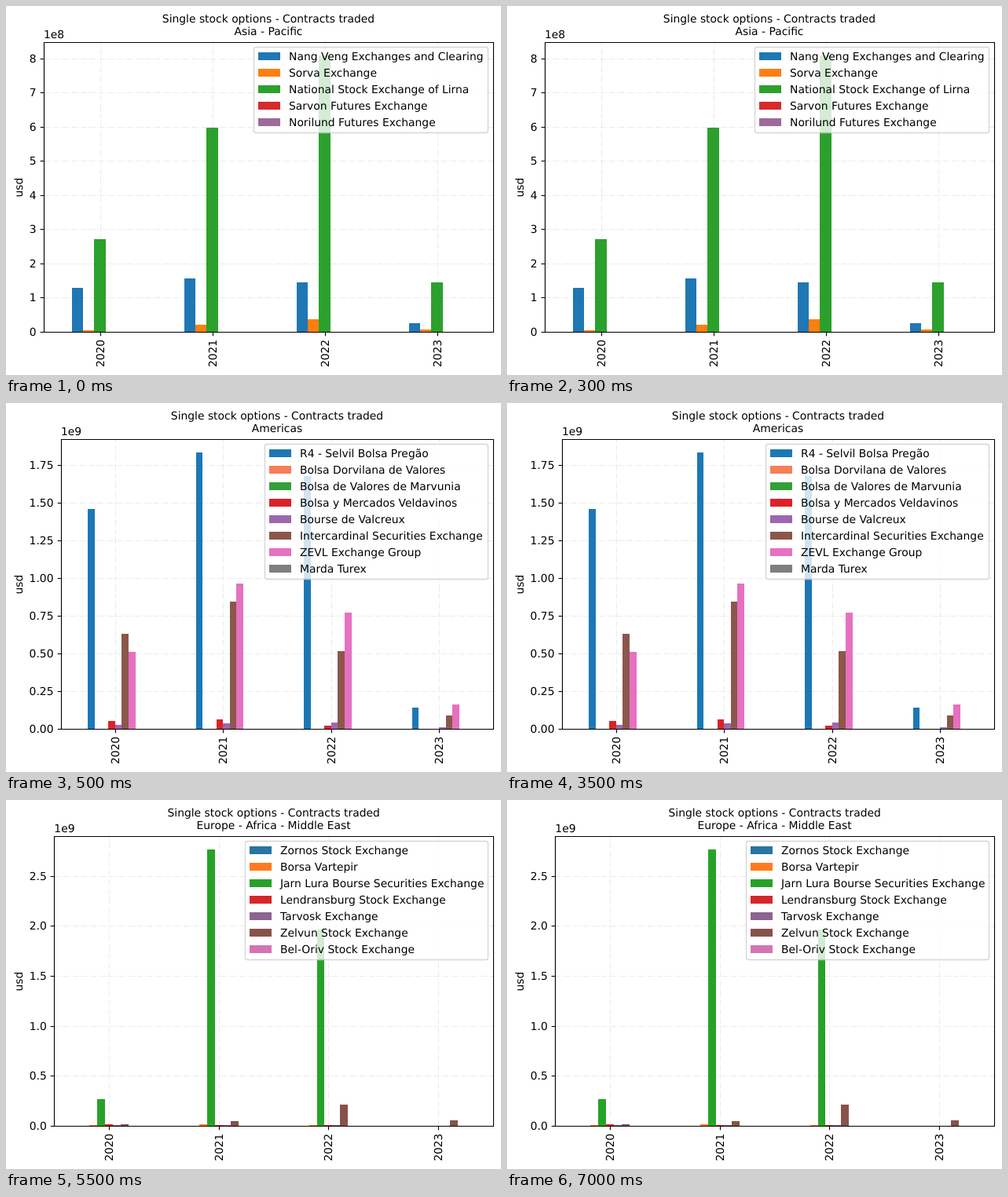
An HTML page for the animation above (8 s loop, 630 by 470 pixels).

```html
<!DOCTYPE html>
<html lang="en">
<head>
<meta charset="utf-8">
<title>Contracts traded</title>
<style>
  html, body { margin: 0; width: 100%; height: 100%; overflow: hidden; background: #fff; }
  svg { position: absolute; left: 0; top: 0; width: 630px; height: 470px; }
  text { font: 13.889px "DejaVu Sans", sans-serif; text-rendering: geometricPrecision; white-space: pre; }
  .line { stroke: #000; stroke-width: 1.11; fill: none; }
  .grid { stroke: #ebebeb; stroke-width: 1.11; stroke-dasharray: 7.11 1.78 1.11 1.78; }
  .legend { fill: #fff; stroke: #ccc; stroke-width: 1.39; opacity: .8; }
</style>
</head>
<body>
<svg id="stage" viewBox="0 0 630 470"></svg>
<script>
const LOOP = 8000, RIGHT = 620, TOP = 45.5, BOTTOM = 414.75;
const YEARS = ['2020', '2021', '2022', '2023'];

// series: [name, colour, value per year]
const charts = [
  {
    from: 0, to: 500, region: 'Asia - Pacific', left: 48, max: 8.49,
    exponent: '1e8', step: 1, digits: 0, labelX: 360,
    series: [
      ['Nang Veng Exchanges and Clearing', '#1f77b4', [1.28, 1.555, 1.44, .24]],
      ['Sorva Exchange', '#ff7f0e', [.04, .2, .36, .06]],
      ['National Stock Exchange of Lirna', '#2ca02c', [2.71, 5.98, 8.09, 1.44]],
      ['Sarvon Futures Exchange', '#d62a2b', []],
      ['Norilund Futures Exchange', '#9c6b98', []]
    ]
  },
  {
    from: 500, to: 5500, region: 'Americas', left: 70, max: 1.927,
    exponent: '1e9', step: .25, digits: 2, labelX: 374,
    series: [
      ['R4 - Selvil Bolsa Pregão', '#1b78b6', [1.46, 1.835, 1.68, .138]],
      ['Bolsa Dorvilana de Valores', '#f67f58', []],
      ['Bolsa de Valores de Marvunia', '#359f38', []],
      ['Bolsa y Mercados Veldavinos', '#dd2129', [.05, .06, .018, 0]],
      ['Bourse de Valcreux', '#9e66b0', [.024, .035, .04, .008]],
      ['Intercardinal Securities Exchange', '#8b574a', [.63, .844, .515, .086]],
      ['ZEVL Exchange Group', '#e671c0', [.51, .964, .77, .16]],
      ['Marda Turex', '#7f7f7f', []]
    ]
  },
  {
    from: 5500, to: 8000, region: 'Europe - Africa - Middle East', left: 61.3, max: 2.903,
    exponent: '1e9', step: .5, digits: 1, labelX: 349,
    series: [
      ['Zornos Stock Exchange', '#2874a3', []],
      ['Borsa Vartepir', '#ff7b1d', [.006, .012, .006, 0]],
      ['Jarn Lura Bourse Securities Exchange', '#27a229', [.264, 2.765, 1.96, 0]],
      ['Lendransburg Stock Exchange', '#d62728', [.012, .008, .006, 0]],
      ['Tarvosk Exchange', '#8c6590', [.003, .006, .006, 0]],
      ['Zelvun Stock Exchange', '#87524a', [.016, .048, .21, .053]],
      ['Bel-Oriv Stock Exchange', '#d475b1', []]
    ]
  }
];

const crisp = v => Math.round(v) + .5;

function add(parent, tag, attrs, content = '') {
  const node = document.createElementNS('http://www.w3.org/2000/svg', tag);
  for (const key in attrs) node.setAttribute(key, attrs[key]);
  node.textContent = content;
  return parent.appendChild(node);
}

const line = (g, cls, d) => add(g, 'path', { class: cls, d });

const label = (g, content, x, y, anchor = 'start', angle = 0) =>
  add(g, 'text', { 'text-anchor': anchor, transform: `translate(${x} ${y}) rotate(${angle})` }, content);

function box(g, x0, y0, x1, y1, fill) {
  [x0, y0, x1, y1] = [x0, y0, x1, y1].map(Math.round);
  if (y1 > y0) add(g, 'rect', { x: x0, y: y0, width: x1 - x0, height: y1 - y0, fill });
}

function drawChart(chart) {
  const { from, to, left, max, series, step, labelX } = chart;
  const g = add(stage, 'g', { opacity: 0 });
  const slot = (RIGHT - left) / YEARS.length;
  const barWidth = slot / 2 / series.length;
  const middle = (left + RIGHT) / 2;
  const axisX = crisp(left);
  const xOf = i => left + slot * (i + .5);
  const yOf = v => BOTTOM - v / max * (BOTTOM - TOP);
  const ticks = [];
  for (let v = 0; v < max; v += step) ticks.push(v);

  YEARS.forEach((_, i) => line(g, 'grid', `M${crisp(xOf(i))} ${BOTTOM}V${TOP}`));
  ticks.forEach(v => line(g, 'grid', `M${left} ${crisp(yOf(v))}H${RIGHT}`));

  series.forEach(([, colour, values], s) => values.forEach((v, i) => {
    const x = xOf(i) - slot / 4 + s * barWidth;
    box(g, x, yOf(v), x + barWidth, BOTTOM, colour);
  }));

  YEARS.forEach((year, i) => {
    const x = crisp(xOf(i));
    line(g, 'line', `M${x} 415.5v4.86`);
    label(g, year, x + 4.5, 424.8, 'end', -90);
  });
  ticks.forEach(v => {
    const y = crisp(yOf(v));
    line(g, 'line', `M${axisX} ${y}h-4.86`);
    label(g, v.toFixed(chart.digits), left - 9.5, y + 4.5, 'end');
  });
  line(g, 'line', `M${axisX} 46.5H620.5V415.5H${axisX}Z`);

  label(g, 'Single stock options - Contracts traded', middle, 21, 'middle');
  label(g, chart.region, middle, 37, 'middle');
  label(g, chart.exponent, left, 41);
  label(g, 'usd', 21, 231, 'middle', -90);

  const frameX = labelX - 44.5;
  add(g, 'rect', {
    class: 'legend', x: frameX, y: 52.5, rx: 2.8,
    width: 613.5 - frameX, height: series.length * 21 + 4
  });
  series.forEach(([name, colour], s) => {
    const y = 59 + s * 21;
    box(g, labelX - 39, y, labelX - 11, y + 10, colour);
    label(g, name, labelX, y + 10);
  });

  const shownAt = t => ({
    opacity: +(t >= from && t < to), offset: t / LOOP, easing: 'step-end'
  });
  const times = [...new Set([0, from, to, LOOP])];
  g.animate(times.map(shownAt), { duration: LOOP, iterations: Infinity });
}

const stage = document.getElementById('stage');
charts.forEach(drawChart);
</script>
</body>
</html>
```
